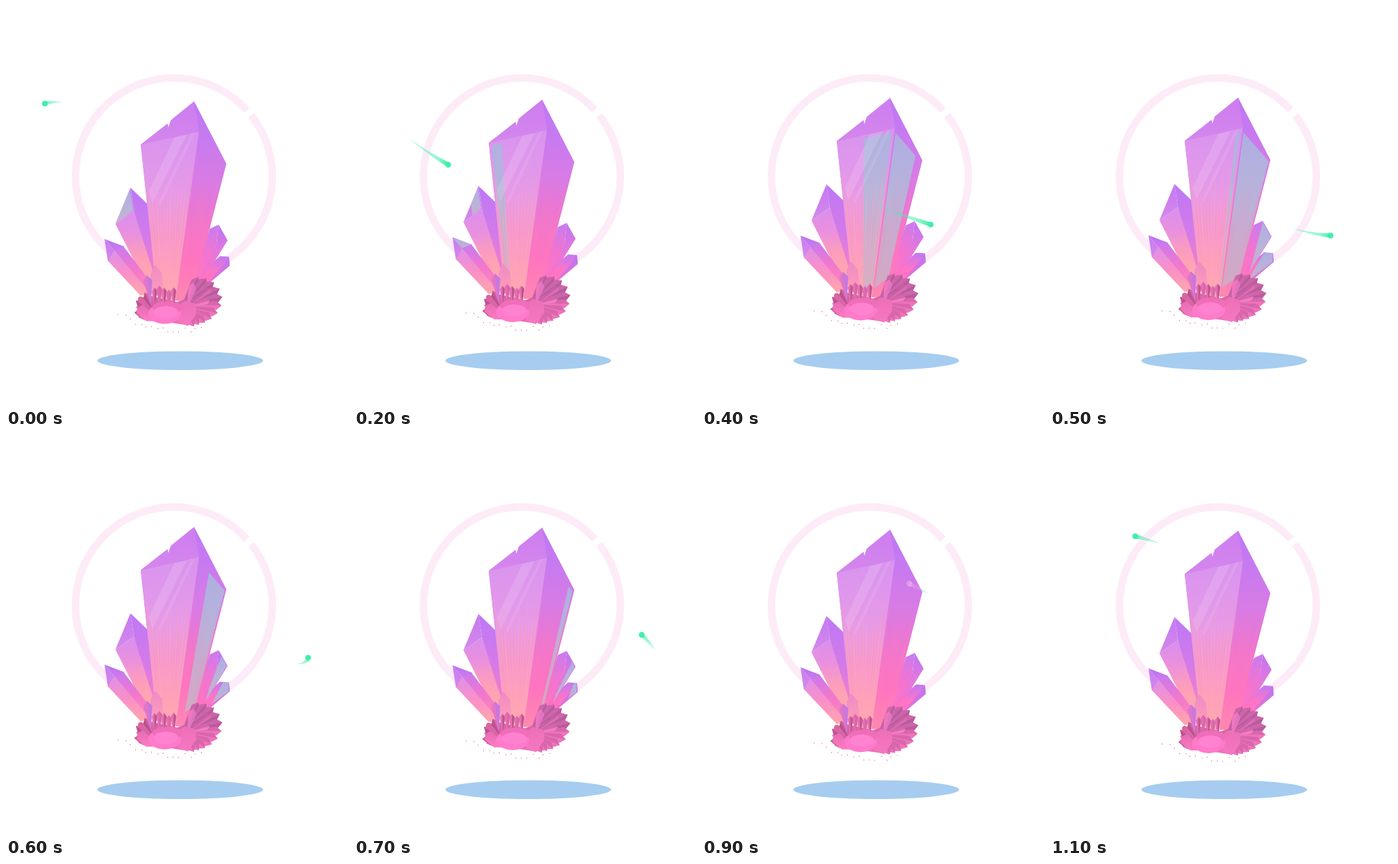
Animation of 500x586 px, one loop 1.2 s. Source, as an HTML page with a canvas:

```html
<!DOCTYPE html>
<html lang="en">
<head>
<meta charset="utf-8">
<title>Floating crystal</title>
<style>
html, body { margin: 0; width: 100%; height: 100%; overflow: hidden; background: #fff; }
canvas { display: block; width: 500px; height: 586px; }
</style>
</head>
<body>
<canvas id="stage"></canvas>
<script>
const W = 500, H = 586, STEPS = 12, STEP_MS = 100, TAU = Math.PI * 2;
const canvas = document.getElementById('stage');
const dpr = window.devicePixelRatio || 1;
canvas.width = W * dpr;
canvas.height = H * dpr;
const ctx = canvas.getContext('2d');
ctx.scale(dpr, dpr);

const parse = s => s.split(' ').map(p => p.split(',').map(Number));
const lerp = (a, b, u) => [a[0] + (b[0] - a[0]) * u, a[1] + (b[1] - a[1]) * u];
const clamp = u => Math.max(0, Math.min(1, u));
const polar = (c, angle, r) => [c[0] + r * Math.cos(angle), c[1] + r * Math.sin(angle)];

function seeded(seed) {
  return () => (seed = (seed * 16807) % 2147483647) / 2147483647;
}

function trace(pts) {
  ctx.beginPath();
  pts.forEach(p => ctx.lineTo(p[0], p[1]));
  ctx.closePath();
}

// Fill with a top-to-bottom blend of the given colours.
function poly(points, ...colors) {
  const pts = typeof points === 'string' ? parse(points) : points;
  const ys = pts.map(p => p[1]);
  const blend = ctx.createLinearGradient(0, Math.min(...ys), 0, Math.max(...ys));
  colors.forEach((c, i) => blend.addColorStop(colors.length > 1 ? i / (colors.length - 1) : 0, c));
  trace(pts);
  ctx.fillStyle = blend;
  ctx.fill();
}

function ellipse(x, y, rx, ry, color) {
  ctx.beginPath();
  ctx.ellipse(x, y, rx, ry, 0, 0, TAU);
  ctx.fillStyle = color;
  ctx.fill();
}

// Two-tone shard growing from a root to a tip.
function shard(root, tip, w, light, dark) {
  const dx = tip[0] - root[0], dy = tip[1] - root[1], len = Math.hypot(dx, dy);
  const nx = -dy / len * w, ny = dx / len * w;
  const neck = lerp(root, tip, 1 - Math.min(0.35, w * 1.2 / len));
  const a = [neck[0] + nx, neck[1] + ny], b = [neck[0] - nx, neck[1] - ny];
  poly([root, a, tip, b], dark);
  poly([root, a, tip], light);
}

// Fine lines fanning between the two sides of a facet.
function stripes([topA, topB, lowB, lowA], count, seed, rgb) {
  const rnd = seeded(seed);
  for (let i = 0; i < count; i++) {
    const u = (i + 0.5) / count;
    const top = lerp(topA, topB, u), low = lerp(lowA, lowB, u);
    const from = lerp(top, low, 0.14 + rnd() * 0.3);
    const fade = ctx.createLinearGradient(0, from[1], 0, low[1]);
    fade.addColorStop(0, `rgba(${rgb},0)`);
    fade.addColorStop(0.35, `rgba(${rgb},${0.3 + rnd() * 0.3})`);
    fade.addColorStop(1, `rgba(${rgb},0.1)`);
    ctx.strokeStyle = fade;
    ctx.lineWidth = 0.8 + rnd() * 0.6;
    ctx.beginPath();
    ctx.moveTo(...from);
    ctx.lineTo(...low);
    ctx.stroke();
  }
}

// Reflection on the part of a facet between lo and hi across its width.
function glint([topA, topB, lowB, lowA], lo, hi) {
  lo = clamp(lo);
  hi = clamp(hi);
  if (hi <= lo) return;
  const at = (u, v) => lerp(lerp(topA, topB, u), lerp(lowA, lowB, u), v);
  const u0 = 0.04 + lo * 0.92, u1 = 0.04 + hi * 0.92;
  poly([at(u0, 0.02), at(u1, 0.02), at(u1, 0.95), at(u0, 0.95)],
    'rgba(174,178,224,.93)', 'rgba(180,186,216,.9)', 'rgba(198,182,200,.85)');
}

const OUTLINE = parse('197,200 236,169.5 237.5,175 241,164.5 275,137 322,228 277,403 268,428 230,428 219,405');
const FRONT = parse('197,200 282,181 248,428 224,424');
const RIGHT = parse('282,181 322,228 276,405 249,428');
const LEFT_FRONT = parse('160,316 187,297 220,402 205,405');
const LEFT_CAP = parse('160,316 182,263 187,297 160,316');
const LOW_CAP = parse('144,338 173,349 158,355 144,338');
const RIGHT_SIDE = parse('311,317 324,340 290,395 299,365');
const LOW_RIGHT = parse('313,363 326,364 327,377 286,408');

function drawBack(step) {
  poly('182,263 208,288 222,400 215,405 187,297', '#bd78f6', '#d47ae9', '#ff7fbd');
  poly(LEFT_FRONT, '#d98fee', '#ea90de', '#ff9fba', '#ffaeac');
  poly(LEFT_CAP, '#c578f2', '#d489ea');
  stripes(LEFT_FRONT, 10, 17, '255,158,176');

  poly('158,354 172,349 212,402 200,421', '#ca79ef', '#f578c9', '#ff8eb8');
  poly('149,370 158,354 210,416 197,421', '#dd91ea', '#f98fc8', '#ffa6ad');
  poly('144,338 158,355 149,371', '#c77cf0', '#d586ea');
  poly(LOW_CAP, '#b873f3', '#cc7aef');

  poly('298,323 311,317 308,345 284,402 274,400', '#c87bf0', '#f374cf', '#ff76c0');
  poly('311,317 324,340 290,395 280,402 308,345', '#bd76f5', '#e777da', '#ff70c0');
  poly('306,369 313,363 326,364 327,377 288,410 276,408', '#c278f2', '#ff75c6', '#ff72bd');
  poly('321,372 326,364 327,377 288,410', '#b876f4', '#f071cd');

  const passing = (from, to) => step >= from && step < to;
  if (step < 4) glint(LEFT_CAP, step / 4, 1);
  if (passing(1, 4)) glint(LOW_CAP, 0, 1);
  if (passing(5, 8)) {
    glint(RIGHT_SIDE, (step - 5) / 3, 1);
    glint(LOW_RIGHT, (step - 5) / 3, 1);
  }
}

function drawMain(step) {
  poly(OUTLINE, '#d084ec');
  poly('275,137 322,228 277,403 268,428 248,428 282,181',
    '#bd78f7', '#c87aef', '#d97be4', '#ee75cf', '#ff72c0', '#ff88b0');
  poly('197,200 282,181 248,428 230,428 219,405',
    '#d993ee', '#df97ec', '#e79ae6', '#f39ad2', '#ffa2ba', '#ffaeac');
  poly('197,200 236,169.5 237.5,175 241,164.5 275,137 282,181', '#cd7df0', '#d486ec');

  // The reflection wipes across both faces as one surface.
  const trail = 0.46 * (step - 3), lead = 0.2 + 0.8 * (step - 2);
  glint(FRONT, trail, lead);
  glint(RIGHT, trail - 1, lead - 1);

  poly('246,190 264,186 214,286 209,268', 'rgba(255,255,255,.13)');
  poly('271,184 276,183 225,290 222,286', 'rgba(255,255,255,.09)');
  stripes(FRONT, 24, 41, '255,140,196');
  stripes(FRONT, 12, 97, '255,178,168');
  stripes(RIGHT, 15, 63, '255,130,180');
}

function drawBase() {
  poly('218,376 228,388 231,425 214,418 211,390', '#ef8ac5', '#ffa0b5');
  poly('194,430 206,420 250,430 290,416 306,430 292,448 266,464 212,456 195,448', '#cf62a2', '#ee6fb7');

  // left clump, then a row of small peaks
  for (let i = 0; i < 6; i++) {
    const tip = polar([213, 440], Math.PI * (0.82 + i * 0.11), 23 + 3 * (i % 2));
    shard([217, 446], tip, 6, i % 2 ? '#d663a4' : '#ef74b9', i % 2 ? '#bb538f' : '#d765a8');
  }
  shard([212, 434], [206, 391], 6.5, '#c678df', '#e076c8');
  for (let i = 0; i < 5; i++) {
    const x = 217 + i * 7;
    shard([x, 440], [x, 409 - 3 * Math.sin(i * 1.6)], 4, i % 2 ? '#d468a9' : '#bd578f', '#e76db2');
  }

  // right fan, darker at the top
  const hub = [257, 435];
  for (let i = 0; i <= 10; i++) {
    const tip = polar(hub, (i * 12 - 60) * Math.PI / 180, 48 + 13 * Math.sin(Math.PI * i / 7));
    shard(hub, tip, 6.5, i < 5 ? '#b75c9c' : '#ee74bb', i < 5 ? '#cd65aa' : '#d966ac');
  }
  shard([263, 438], [300, 410], 4.5, '#dd6cb3', '#c65fa2');
  shard([260, 438], [298, 428], 4.5, '#f57cc3', '#d467aa');
  shard([265, 440], [274, 402], 6, '#e274c2', '#ef77bd');
  poly('248,438 262,428 278,433 278,448 266,465 252,460', '#ec70b6', '#f777c2');

  poly('192,438 200,434 214,446 218,458 205,458 191,447', '#e66bb0', '#fb7cc5');
  ellipse(197, 426, 4, 4, '#db649f');
  ellipse(232, 447, 24, 15, '#ff7acb');
  ellipse(236, 438, 22, 9, '#f06db9');
  ellipse(234, 445, 18, 9, '#ff82d0');

  const rnd = seeded(29);
  for (let i = 0; i < 16; i++) {
    const x = 164 + i * 8 + rnd() * 4;
    ellipse(x, 442 + Math.min(24, i * 5) + rnd() * 8, 0.7, 0.7, '#d4609b');
  }
}

// Tilted orbit of the light, which lags on the far side.
function orbitAt(s) {
  const lag = 20 * Math.max(0, Math.cos((s - 10.5) / STEPS * TAU));
  const a = (30 * s - 3 - lag) * Math.PI / 180;
  return [245 - 197 * Math.cos(a), 238 - 85 * Math.cos(a) + 48 * Math.sin(a)];
}

function drawComet(step, rgb, strength) {
  const n = 12, size = 4.2, left = [], right = [];
  const length = 0.6 + 0.24 * Math.sin((step - 1) / STEPS * TAU);
  const head = orbitAt(step), end = orbitAt(step - length);
  for (let i = 0; i <= n; i++) {
    const s = step - length * i / n;
    const p = orbitAt(s), q = orbitAt(s - 0.02);
    const dx = p[0] - q[0], dy = p[1] - q[1], len = Math.hypot(dx, dy) || 1;
    const w = size * 0.8 * (1 - i / n);
    left.push([p[0] - dy / len * w, p[1] + dx / len * w]);
    right.unshift([p[0] + dy / len * w, p[1] - dx / len * w]);
  }
  const fade = ctx.createLinearGradient(...head, ...end);
  fade.addColorStop(0, `rgba(${rgb},${strength})`);
  fade.addColorStop(0.25, `rgba(${rgb},${strength * 0.55})`);
  fade.addColorStop(1, `rgba(${rgb},${strength * 0.35})`);
  trace(left.concat(right));
  ctx.fillStyle = fade;
  ctx.fill();
  ellipse(...head, size, size, `rgba(${rgb},${strength})`);
}

function drawRing() {
  const gap = -40.3 * Math.PI / 180, half = 0.034;
  ctx.beginPath();
  ctx.arc(245.5, 249, 144, gap + half, gap - half + TAU);
  ctx.strokeStyle = '#fdecf8';
  ctx.lineWidth = 11;
  ctx.stroke();
}

function draw(step) {
  const bob = 3 * Math.cos((step - 11) / STEPS * TAU);
  const behind = step >= 8;
  const glow = '66,238,172';
  ctx.fillStyle = '#fff';
  ctx.fillRect(0, 0, W, H);
  drawRing();
  ellipse(254.7, 518.2, 121, 13.8, '#a6cdef');
  if (behind) drawComet(step, glow, 1);

  ctx.save();
  ctx.translate(0, bob);
  drawBack(step);
  drawMain(step);
  drawBase();
  if (behind) {
    // shows faintly through the crystal
    trace(OUTLINE);
    ctx.clip();
    ctx.translate(0, -bob);
    drawComet(step, '238,176,238', 0.6);
  }
  ctx.restore();

  if (!behind) drawComet(step, glow, 1);
}

const start = performance.now();
function tick() {
  draw(Math.floor((performance.now() - start) / STEP_MS) % STEPS);
  requestAnimationFrame(tick);
}
tick();
</script>
</body>
</html>
```
